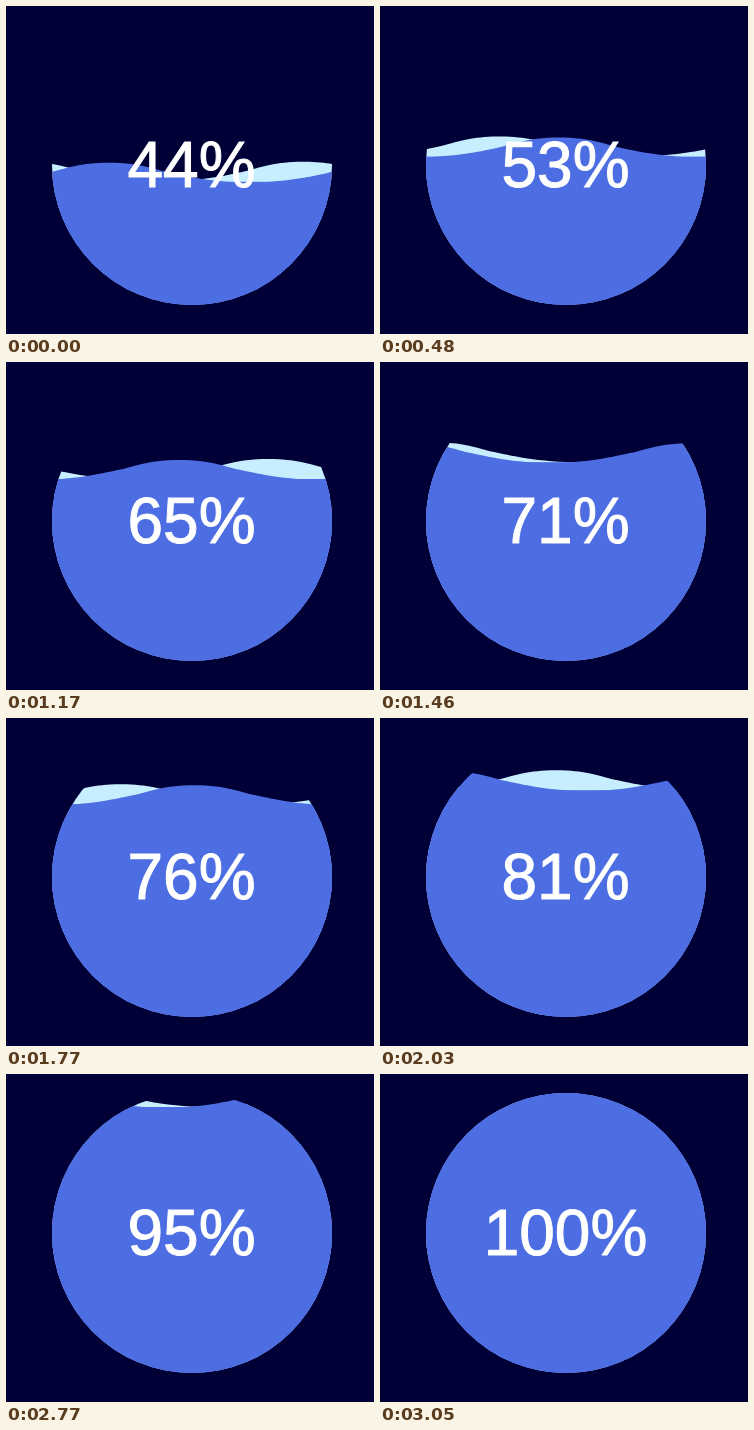
An HTML page for the animation above (3340 ms loop, 368 px wide and 328 px high).

```html
<!DOCTYPE html>
<html lang="en">
<head>
<meta charset="utf-8">
<title>Water fill</title>
<style>
  html, body { margin: 0; width: 100%; height: 100%; overflow: hidden; background: #000036; }
  svg { display: block; }
  text {
    font: 64px "Liberation Sans", Arial, sans-serif;
    text-anchor: middle;
    fill: #fff;
    stroke: #fff;
    stroke-width: 1;
  }
</style>
</head>
<body>
<svg width="368" height="328">
  <clipPath id="bowl"><circle cx="186" cy="159" r="140"/></clipPath>
  <g clip-path="url(#bowl)">
    <g id="water">
      <path id="back" fill="#c7eeff"/>
      <g fill="#4d6de3">
        <path id="front"/>
        <rect x="46" width="280" height="300"/>
      </g>
    </g>
  </g>
  <text id="label" x="185.5" y="180.5"></text>
</svg>
<script>
const LOOP = 3340, TICK = 46.6, LEFT = 46, TOP = 19, SIZE = 280;
const $ = id => document.getElementById(id);

// Crest to trough, then trough to crest
const fall = 'c13.6-.1 24.3 1.4 31.5 2.7c10.5 2 14.5 3.8 30.1 7.4c.8.2 13.9 3.2 27.3 5.4c12.3 2 29.6 4.1 51.1 4.5';
const rise = 'c21.5-.4 38.8-2.5 51.1-4.5c13.4-2.2 26.5-5.2 27.3-5.4c15.6-3.6 19.6-5.4 30.1-7.4c7.1-1.3 17.9-2.8 31.5-2.7';
const wave = 'M0-20' + (fall + rise).repeat(2) + 'v300H0z';
$('back').setAttribute('d', wave);
$('front').setAttribute('d', wave);

function move(id, x, y) {
  $(id).setAttribute('transform', `translate(${x} ${y})`);
}

function draw(t) {
  // The picture advances in steps; the first one is held a little longer
  const tick = Math.max(0, Math.floor(t / TICK - 0.28));
  const shift = 251.5 + 10.2 * tick;
  const percent = Math.min(100, Math.floor(44.44 + 0.862 * tick));
  move('water', 0, TOP + SIZE * (1 - percent / 100));
  move('back', LEFT - SIZE + shift % SIZE, 0);
  move('front', LEFT - 2 * shift % SIZE, 1);
  $('label').textContent = percent + '%';
}

const start = performance.now();
function frame() {
  draw((performance.now() - start) % LOOP);
  requestAnimationFrame(frame);
}
frame();
</script>
</body>
</html>
```
